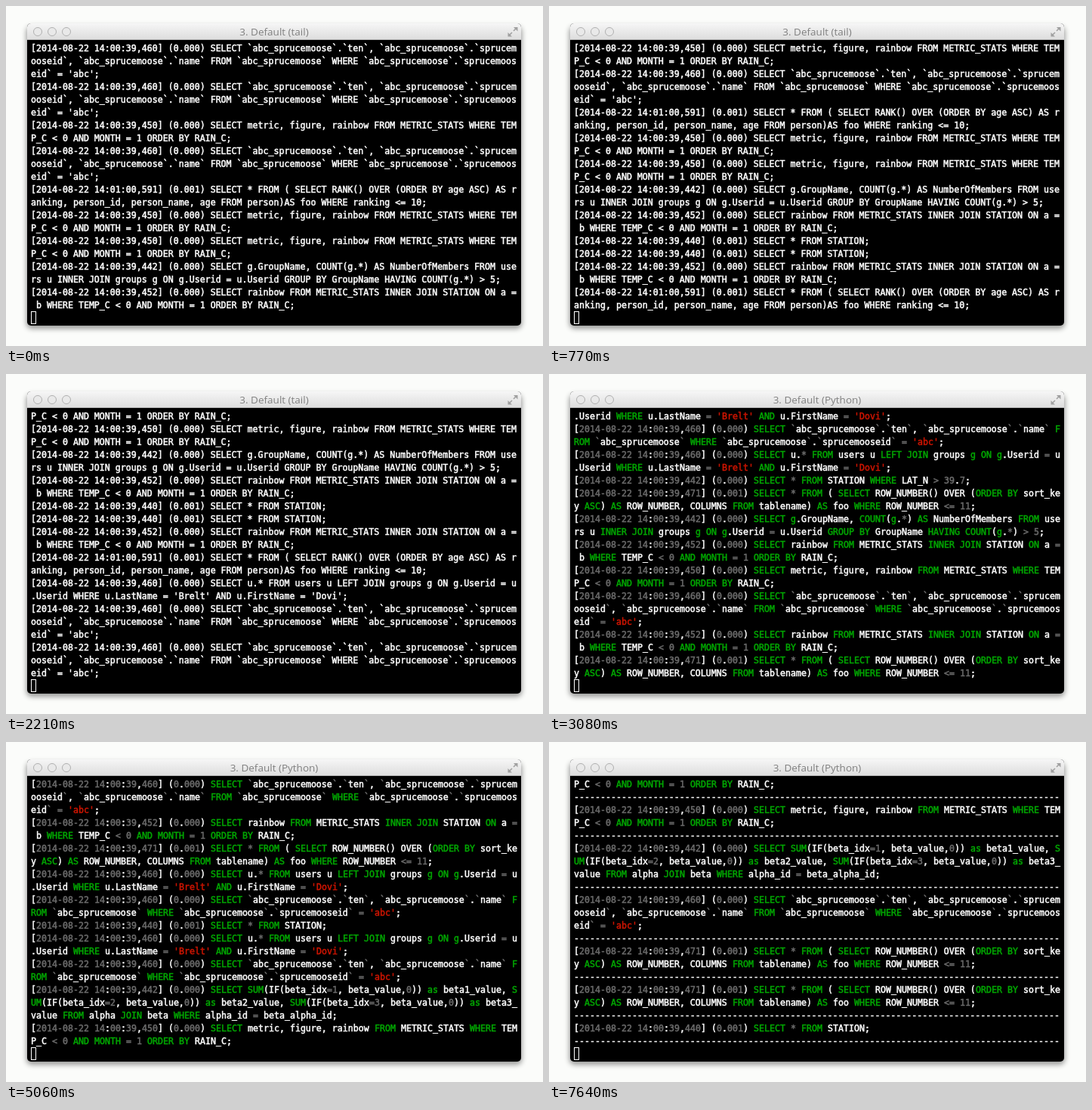
An HTML page that plays this animation: 711 px wide and 450 px high, repeating every 8 s.

```html
<!DOCTYPE html>
<html lang="en">
<head>
<meta charset="utf-8">
<title>Terminal log</title>
<style>
html, body { margin: 0; width: 100%; height: 100%; overflow: hidden; background: #fbfcfa; }
svg { display: block; width: 711px; height: 450px; }
#rows text { font: 11.627px "DejaVu Sans Mono", monospace; white-space: pre; stroke-width: .5px; }
#title { font: 13.5px "Open Sans", sans-serif; fill: #808080; text-anchor: middle; }
</style>
</head>
<body>
<svg viewBox="0 0 711 450">
  <defs>
    <linearGradient id="bar" x1="0" y1="0" x2="0" y2="1">
      <stop offset="0" stop-color="#f6f6f6"/>
      <stop offset="1" stop-color="#dcdcdc"/>
    </linearGradient>
    <filter id="blur" x="-10%" y="-10%" width="120%" height="120%">
      <feGaussianBlur stdDeviation="3.5"/>
    </filter>
  </defs>
  <rect width="711" height="450" fill="#fbfcfa"/>
  <rect x="27" y="27" width="656" height="400" rx="7" fill="#000" opacity=".4" filter="url(#blur)"/>
  <rect x="28" y="23" width="654" height="400" rx="5" fill="#000"/>
  <path d="M28 45V28a5 5 0 0 1 5-5H677a5 5 0 0 1 5 5V45Z" fill="url(#bar)"/>
  <path d="M28 44.5H682" stroke="#b4b4b4"/>
  <g fill="#e9e9e9" stroke="#b0b0b0">
    <circle cx="42" cy="34" r="5.5"/>
    <circle cx="61" cy="34" r="5.5"/>
    <circle cx="80" cy="34" r="5.5"/>
  </g>
  <g fill="#a0a0a0" stroke="#a0a0a0">
    <path d="M672 33L676 29M670 35L666 39" stroke-width="1.6"/>
    <path d="M672 28H677.500V33.500ZM664.500 35V40.500H670Z" stroke="none"/>
  </g>
  <text id="title" x="355" y="39"></text>
  <g id="rows"></g>
  <rect x="33.5" y="404.500" width="6" height="16" fill="none" stroke="#fff"/>
</svg>
<script>
const LOOP = 8000, COLS = 92, ROWS = 21, CELL = 7, LINE = 17, LEFT = 33, BASE = 60;
const WHITE = '#fff', GREEN = '#00a600', GREY = '#6b6b6b', RED = '#cc1400';

const stamp = (time, cost) => `[2014-08-22 14:${time}] (0.00${cost}) SELECT `;
const moose = '`abc_sprucemoose`';
const QUERIES = {
  A: stamp('00:39,460', 0) + `${moose}.\`ten\`, ${moose}.\`sprucemooseid\`, ${moose}.\`name\` FROM ${moose} WHERE ${moose}.\`sprucemooseid\` = 'abc';`,
  N: stamp('00:39,460', 0) + `${moose}.\`ten\`, ${moose}.\`name\` FROM ${moose} WHERE ${moose}.\`sprucemooseid\` = 'abc';`,
  M: stamp('00:39,450', 0) + 'metric, figure, rainbow FROM METRIC_STATS WHERE TEMP_C < 0 AND MONTH = 1 ORDER BY RAIN_C;',
  B: stamp('00:39,452', 0) + 'rainbow FROM METRIC_STATS INNER JOIN STATION ON a = b WHERE TEMP_C < 0 AND MONTH = 1 ORDER BY RAIN_C;',
  R: stamp('01:00,591', 1) + '* FROM ( SELECT RANK() OVER (ORDER BY age ASC) AS ranking, person_id, person_name, age FROM person)AS foo WHERE ranking <= 10;',
  W: stamp('00:39,471', 1) + '* FROM ( SELECT ROW_NUMBER() OVER (ORDER BY sort_key ASC) AS ROW_NUMBER, COLUMNS FROM tablename) AS foo WHERE ROW_NUMBER <= 11;',
  G: stamp('00:39,442', 0) + 'g.GroupName, COUNT(g.*) AS NumberOfMembers FROM users u INNER JOIN groups g ON g.Userid = u.Userid GROUP BY GroupName HAVING COUNT(g.*) > 5;',
  U: stamp('00:39,460', 0) + "u.* FROM users u LEFT JOIN groups g ON g.Userid = u.Userid WHERE u.LastName = 'Brelt' AND u.FirstName = 'Dovi';",
  S: stamp('00:39,440', 1) + '* FROM STATION;',
  L: stamp('00:39,442', 0) + '* FROM STATION WHERE LAT_N > 39.7;',
  Q: stamp('00:39,442', 0) + 'SUM(IF(beta_idx=1, beta_value,0)) as beta1_value, SUM(IF(beta_idx=2, beta_value,0)) as beta2_value, SUM(IF(beta_idx=3, beta_value,0)) as beta3_value FROM alpha JOIN beta WHERE alpha_id = beta_alpha_id;'
};

// Each session starts with a full screen, then appends queries at set times.
const SESSIONS = [
  { title: '3. Default (tail)', log: [[0, 'AAMARMMGB'], [350, 'S'], [530, 'S'], [650, 'B'],
    [770, 'R'], [1010, 'U'], [1190, 'A'], [2210, 'A'], [2500, 'U']] },
  { title: '3. Default (Python)', color: true, log: [[3080, 'UNULWGBMABW'], [4040, 'UNSU'],
    [5060, 'NQM'], [6080, 'BLAL'], [7100, 'WMS']] },
  { title: '3. Default (Python)', color: true, ruled: true, log: [[7640, 'MMQAWWS']] }
];

const KEYWORD = /^(SELECT|FROM|WHERE|AND|MONTH|ORDER|BY|INNER|LEFT|JOIN|ON|GROUP|HAVING|COUNT|SUM|ASC|AS|G)$/i;
const TOKEN = /'[^']*'|[A-Za-z_]\w*|\d+|[-+*\/<>=`]|[\s\S]/g;

function tint(token) {
  if (token.length > 1 && token[0] === "'") return RED;
  if (KEYWORD.test(token)) return GREEN;
  return /^[\d\-+*\/<>=`]/.test(token) ? GREY : WHITE;
}

// Split a query into screen lines made of [text, colour] runs.
function wrap(query, color) {
  const lines = [];
  let count = 0;
  for (const token of query.match(TOKEN)) {
    const fill = color ? tint(token) : WHITE;
    for (const ch of token) {
      if (count++ % COLS === 0) lines.push([]);
      const line = lines[lines.length - 1], last = line[line.length - 1];
      if (last && last[1] === fill) last[0] += ch;
      else line.push([ch, fill]);
    }
  }
  return lines;
}

const screens = [];
for (const { title, color, ruled, log } of SESSIONS) {
  let lines = [];
  for (const [start, keys] of log) {
    for (const key of keys) {
      lines = lines.concat(wrap(QUERIES[key], color));
      if (ruled) lines.push([['-'.repeat(COLS), WHITE]]);
    }
    screens.push({ start, title, lines: lines.slice(-ROWS) });
  }
}

const make = (tag, attrs, parent) => {
  const node = document.createElementNS('http://www.w3.org/2000/svg', tag);
  for (const name in attrs) node.setAttribute(name, attrs[name]);
  return parent.appendChild(node);
};
const titleNode = document.getElementById('title');
const rowGroup = document.getElementById('rows');
const rowNodes = Array.from({ length: ROWS }, (_, i) =>
  make('text', { x: LEFT, y: BASE + i * LINE }, rowGroup));

function draw({ title, lines }) {
  titleNode.textContent = title;
  rowNodes.forEach((row, i) => {
    row.textContent = '';
    let col = 0;
    for (const [text, fill] of lines[i] || []) {
      make('tspan', { x: LEFT + col * CELL, fill, stroke: fill }, row).textContent = text;
      col += text.length;
    }
  });
}

let shown = null;
const began = performance.now();
function update() {
  const t = (performance.now() - began) % LOOP;
  const screen = screens.filter(s => s.start <= t).pop();
  if (screen !== shown) draw(shown = screen);
  requestAnimationFrame(update);
}
update();
</script>
</body>
</html>
```
